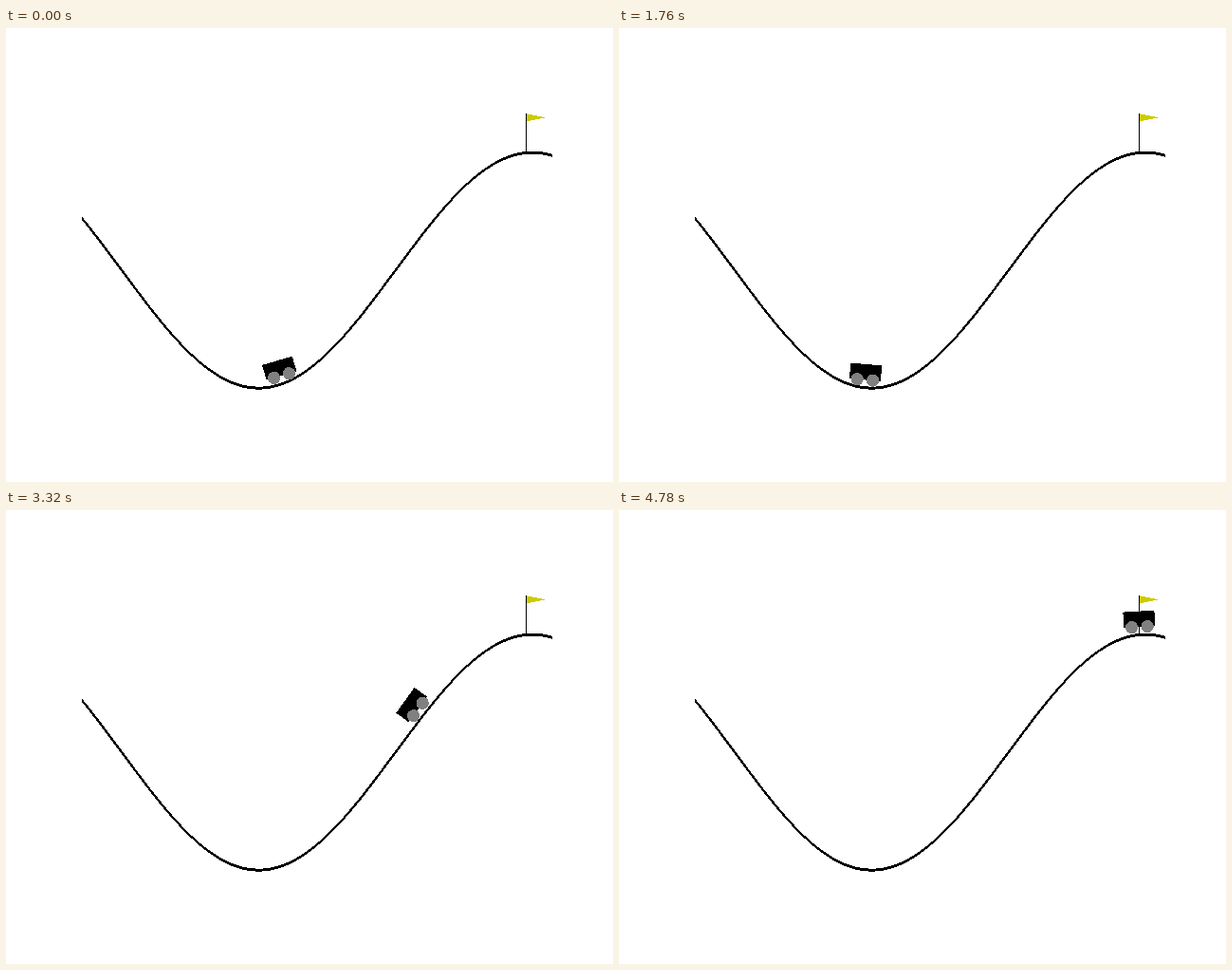
An HTML page that plays this animation: 640x478 px, repeating every 4800 ms.

```html
<!DOCTYPE html>
<html lang="en">
<head>
<meta charset="utf-8">
<title>Car in a valley</title>
<style>
  html, body { margin: 0; width: 100%; height: 100%; overflow: hidden; background: #fff; }
  svg { display: block; width: 640px; height: 478px; }
</style>
</head>
<body>
<svg viewBox="0 0 640 478" shape-rendering="crispEdges">
  <clipPath id="view"><rect width="600" height="400"/></clipPath>
  <!-- world of 600 x 400 units, y pointing up -->
  <g transform="translate(80 406.7) scale(.82667 -.82667)" clip-path="url(#view)">
    <path id="track"/>
    <g id="car">
      <rect x="-20" y="10" width="40" height="20"/>
      <circle cx="10" cy="10" r="8" fill="#808080"/>
      <circle cx="-10" cy="10" r="8" fill="#808080"/>
    </g>
    <g transform="translate(566.67 332.96)">
      <path d="M0 50V40L25 45Z" fill="#cccc00"/>
      <path d="M0 0V50" stroke="#000" stroke-width="1.2"/>
    </g>
  </g>
</svg>
<script>
const STEP = 20, STEPS = 240, SCALE = 600 / 1.8, GRAVITY = 0.0025;
const worldX = p => (p + 1.2) * SCALE;
const worldY = p => (Math.sin(3 * p) * 0.45 + 0.55) * SCALE;
const energy = (p, speed) => speed * speed / 2 + GRAVITY / 3 * Math.sin(3 * p);

// ends of the swings: the car sets off from rest at each one
const turns = [
  { step: 0, p: -0.4275 },
  { step: 31.5, p: -0.772 },
  { step: 71, p: -0.174 },
  { step: 109, p: -1.0255 },
  { step: 157.5, p: 0.2055 },
  { step: 193.3, p: -1.2, speed: 0.045 }, // hits the left wall
  { step: 239, p: 0.503, speed: 0.028 }   // reaches the flag
];

// positions along one swing, with the steady push that its energy balance needs
function swing(from, to) {
  const push = (energy(to.p, to.speed || 0) - energy(from.p, 0)) / (to.p - from.p);
  const dir = Math.sign(to.p - from.p), dt = 0.02, path = [from.p];
  let p = from.p, v = 0;
  do {
    v += (push - GRAVITY * Math.cos(3 * p)) * dt;
    p += v * dt;
    path.push(p);
  } while (dir * v > 0 && dir * (to.p - p) > 0);
  return path;
}

// one position per step, each swing fitted to its time span
function ride() {
  const positions = [];
  for (let i = 1; i < turns.length; i++) {
    const from = turns[i - 1], to = turns[i], path = swing(from, to);
    for (let n = Math.ceil(from.step); n <= to.step; n++) {
      const t = (n - from.step) / (to.step - from.step);
      positions[n] = path[Math.round(t * (path.length - 1))];
    }
  }
  return positions;
}

// the line is equally thick along its minor axis everywhere
function trackPath() {
  const top = [], bottom = [];
  for (let i = 0; i < 100; i++) {
    const p = -1.2 + 1.8 * i / 99;
    const half = 1.8 * Math.max(1, Math.abs(1.35 * Math.cos(3 * p)));
    top.push([worldX(p), worldY(p) + half]);
    bottom.unshift([worldX(p), worldY(p) - half]);
  }
  return "M" + top.concat(bottom).map(q => q.map(c => c.toFixed(2)).join(" ")).join("L") + "Z";
}

const car = document.getElementById("car");
const positions = ride();
document.getElementById("track").setAttribute("d", trackPath());

function draw(time) {
  const p = positions[Math.floor(time / STEP) % STEPS];
  const angle = Math.cos(3 * p) * 180 / Math.PI;
  car.setAttribute("transform", `translate(${worldX(p)} ${worldY(p)}) rotate(${angle})`);
}

let start;
function tick(now) {
  start ??= now;
  draw(now - start);
  requestAnimationFrame(tick);
}
draw(0);
requestAnimationFrame(tick);
</script>
</body>
</html>
```
